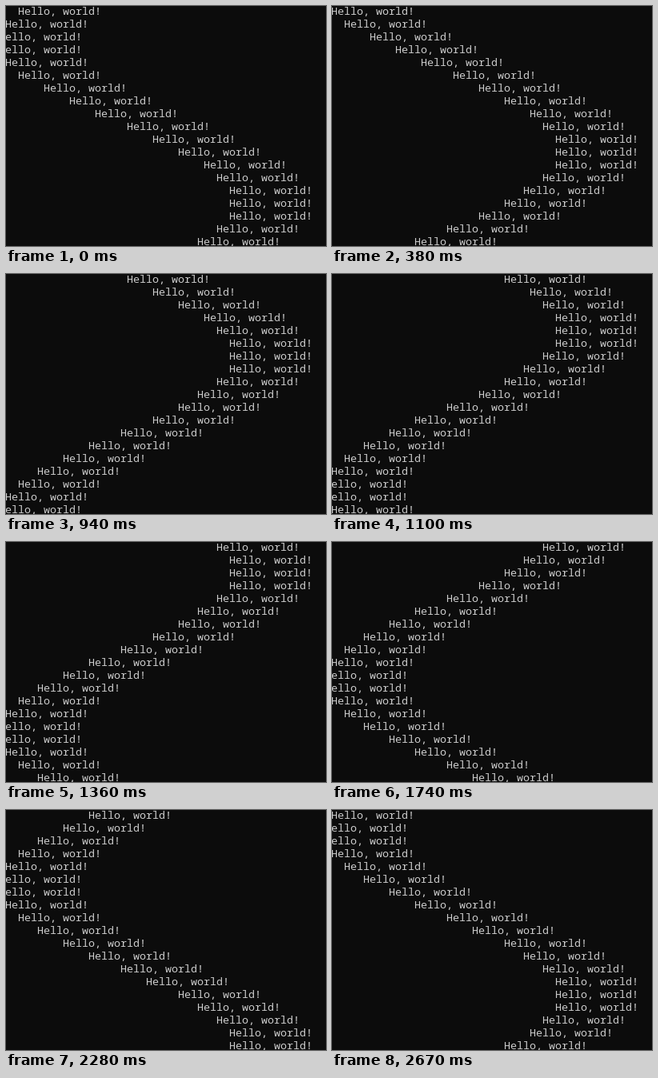
These frames come from a looping animation (400 by 300 pixels, 2720 ms). An HTML page with a canvas:

```html
<!DOCTYPE html>
<html lang="en">
<head>
<meta charset="utf-8">
<title>Hello wave</title>
<style>
  html, body { margin: 0; width: 100%; height: 100%; overflow: hidden; background: #0c0c0c; }
  canvas { display: block; }
</style>
</head>
<body>
<canvas id="stage" width="400" height="300"></canvas>
<script>
const ctx = document.getElementById('stage').getContext('2d', { alpha: false });
const LOOP = 2720;
const TEXT = 'Hello, world!';
const CELL_W = 8, CELL_H = 16, ROWS = 19;
const LEFT = -1, BASELINE = 11;
const LINE_MS = 104, LINE_PHASE = 0.55;

// Moments at which the terminal picture refreshes.
const REFRESH = [0, 130, 260, 380, 520, 680, 800, 940, 1100, 1230, 1360,
  1490, 1610, 1740, 1860, 2000, 2160, 2280, 2420, 2550, 2670];

const indent = line => Math.round(17 - 18.4 * Math.cos(line * 0.25 - 0.595));

function firstLine(time) {
  const shown = REFRESH.findLast(t => t <= time);
  return Math.floor(shown / LINE_MS + LINE_PHASE);
}

function drawLine(line, row) {
  const x = LEFT + indent(line) * CELL_W;
  const y = BASELINE + row * CELL_H;
  [...TEXT].forEach((char, i) => ctx.fillText(char, x + i * CELL_W, y));
}

function draw(time) {
  ctx.fillStyle = '#0c0c0c';
  ctx.fillRect(0, 0, 400, 300);
  ctx.fillStyle = '#cccccc';
  ctx.font = '13.333px "Noto Sans Mono", monospace';
  const first = firstLine(time);
  for (let row = 0; row < ROWS; row++) drawLine(first + row, row);
}

const start = performance.now();
function tick() {
  draw((performance.now() - start) % LOOP);
  requestAnimationFrame(tick);
}
tick();
</script>
</body>
</html>
```
